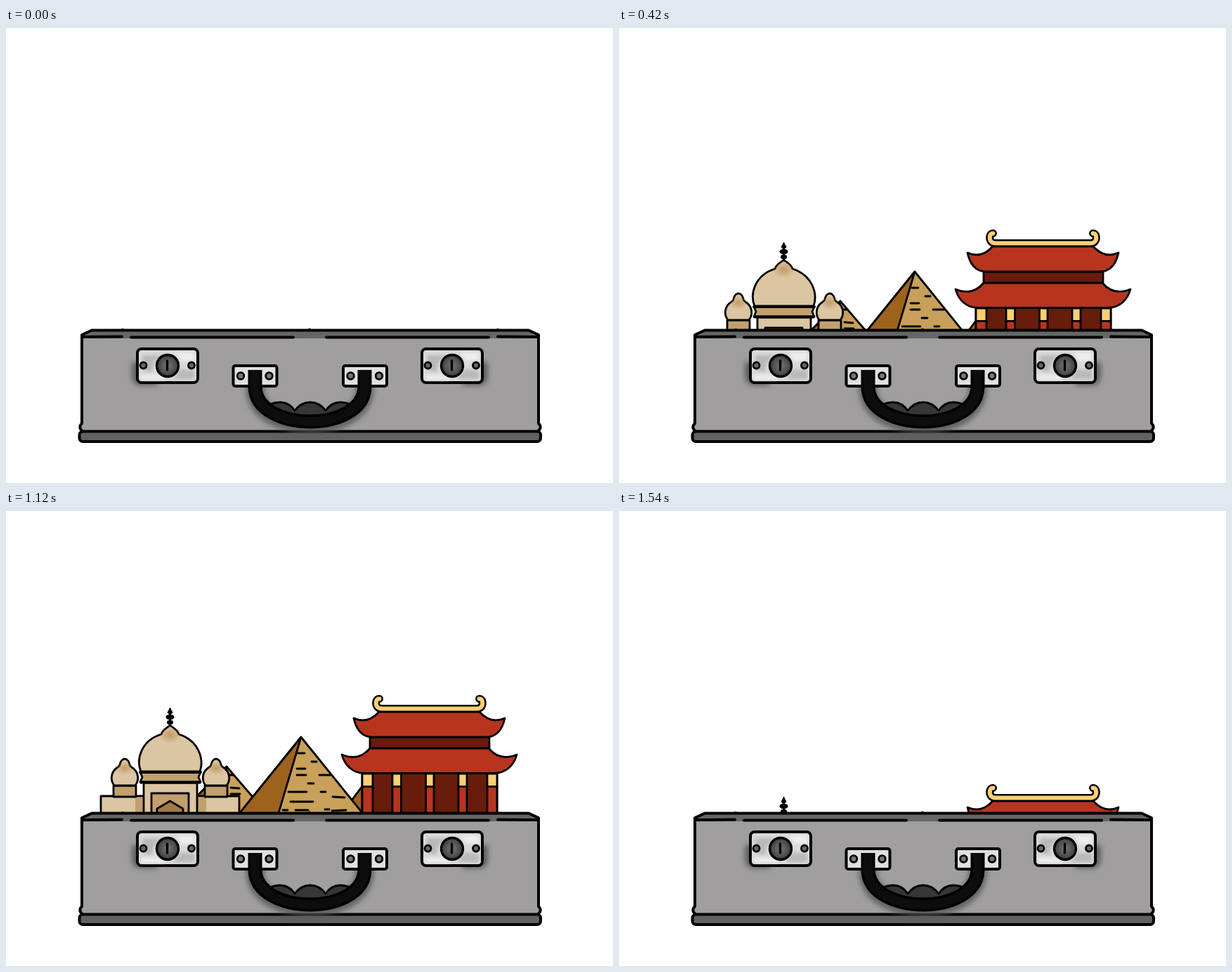
Write an HTML page that moves like this. It is 864 px wide and 648 px high and loops after 1.68 s.

```html
<!DOCTYPE html>
<html lang="en">
<head>
<meta charset="utf-8">
<title>Suitcase of landmarks</title>
<style>
  html, body { margin: 0; width: 100%; height: 100%; overflow: hidden; background: #fff; }
  svg { display: block; width: 100%; height: 100%; }
  .ink { stroke: #000; stroke-width: 2.8; stroke-linejoin: round; stroke-linecap: round; }
  .bold { stroke: #000; stroke-width: 4; stroke-linejoin: round; stroke-linecap: round; }
  .line { fill: none; }
  .cream { fill: #dbc5a2; }
  .tan { fill: #c2a06d; }
  .sand { fill: #c8a05a; }
  .umber { fill: #9d631c; }
  .red { fill: #b7351f; }
  .maroon { fill: #671c0c; }
  .gold { fill: #fbd071; }
</style>
</head>
<body>
<svg viewBox="0 0 864 648">
  <defs>
    <filter id="soft" x="-50%" y="-50%" width="200%" height="200%"><feGaussianBlur stdDeviation="3.5"/></filter>
    <filter id="faint" x="-50%" y="-50%" width="200%" height="200%"><feGaussianBlur stdDeviation="2"/></filter>
    <radialGradient id="knob"><stop offset=".2" stop-color="#6c6c6c"/><stop offset="1" stop-color="#3c3c3c"/></radialGradient>
    <radialGradient id="tipShade"><stop offset=".1" stop-color="#b98f50" stop-opacity=".7"/><stop offset="1" stop-color="#b98f50" stop-opacity="0"/></radialGradient>
    <clipPath id="aboveCase"><path d="M0 0H864V434H0Z"/></clipPath>

    <g id="turret">
      <path class="ink tan" d="M151 366H183V382H151Z"/>
      <path class="ink cream" d="M152 366C146 358 147 346 157 340Q160 338 160 336C161 331 164 328 167 328S173 331 174 336Q174 338 177 340C187 346 188 358 182 366Z"/>
      <ellipse cx="167" cy="341" rx="13" ry="10" fill="url(#tipShade)"/>
    </g>

    <g id="lock">
      <rect class="bold" x="187" y="457" width="86" height="48" rx="6" fill="#d8d9d8"/>
      <g filter="url(#faint)">
        <path d="M194 466H222Q208 474 208 490L196 488ZM248 486L268 488V500H238Z" fill="#b9b9b9"/>
        <path d="M242 462H268V474H250ZM192 494H226V501H192Z" fill="#ededec"/>
      </g>
      <g class="ink">
        <circle cx="230" cy="481" r="15.5" fill="url(#knob)" stroke-width="3.4"/>
        <path d="M229.5 474V487" stroke-width="3.4"/>
        <circle cx="195.5" cy="480.5" r="4.5" fill="#686868"/>
        <circle cx="264" cy="480.5" r="4.5" fill="#686868"/>
      </g>
    </g>

    <g id="bracket">
      <rect class="bold" x="323.5" y="481" width="62" height="29" rx="3" fill="#e0e0e0"/>
      <path d="M329 504H380" stroke="#bbb" stroke-width="5" filter="url(#faint)"/>
      <circle class="ink" cx="334" cy="495.5" r="4.8" fill="#777"/>
      <circle class="ink" cx="374.5" cy="495.5" r="4.8" fill="#777"/>
    </g>
    <path id="grip" d="M354.5 487V511C355 544 395 560.5 433 560.5S510 544 510.5 511V487"/>
    <path id="ridge" d="M529.5 242.5C525 242 523 249 526.5 254Q528.5 256.500 533 256.500H668Q672.500 256.500 674.500 254C678 249 676 242 671.500 242.500"/>
  </defs>

  <g clip-path="url(#aboveCase)">
    <g id="landmarks">
      <!-- pyramids -->
      <path class="ink sand" d="M312 339L392 432H219Z"/>
      <path class="ink umber" d="M312 339L292 432H219Z"/>
      <path class="ink umber" d="M530 334L570 432H456Z"/>
      <path class="ink sand" d="M418 297L527 432H309Z"/>
      <path class="ink umber" d="M418 297L378 432H309Z"/>
      <path class="ink line" d="M414 320h9M433 332h7M412 342h12M412 351h13M444 351h16M428 363h8M400 375h26M446 375h7M463 382l17 1M403 389h32M392 401h7M410 401h18M452 400h6M462 402l20-1M388 412h49M463 413l32-1
        M316 351h6M318 369l12 1M318 378h13"/>

      <!-- domed palace -->
      <path class="ink cream" d="M133 381H194V432H133ZM270 381H330V432H270Z"/>
      <path class="tan" d="M182 382.5H193V432H182ZM271 382.5H283V432H271Z"/>
      <use href="#turret"/>
      <use href="#turret" x="130"/>
      <path class="ink cream" d="M194 362H270V432H194Z"/>
      <path class="ink tan" d="M205 377H258V432H205Z"/>
      <path class="ink" fill="#a17b42" d="M213 432V399L231.5 388L250 399V432Z"/>
      <path class="ink tan" d="M189 347H275L272 354L275 361H189L192 354Z"/>
      <path class="bold line" d="M189 347H275M190 361.5H274"/>
      <path class="ink cream" d="M190 346C183 329 190 302 219 293C221 286 226 285 231.5 280C237 285 242 286 244 293C273 302 280 329 274 346Z"/>
      <ellipse cx="231.5" cy="294" rx="16" ry="12" fill="url(#tipShade)"/>
      <path class="ink" d="M231.5 257V281" stroke-width="2"/>
      <path d="M231.5 255L235.5 262L231.5 266L227.5 262Z"/>
      <ellipse cx="231.5" cy="268.5" rx="6" ry="3.8"/>
      <ellipse cx="231.5" cy="276" rx="4.5" ry="3.2"/>

      <!-- red temple -->
      <path class="ink gold" d="M494 421.5H709L715 432H487Z"/>
      <path class="ink maroon" d="M505 348H697V421.5H505Z"/>
      <g id="columns" class="ink"></g>
      <path class="ink maroon" d="M516 297H686V314H516Z"/>
      <path class="ink red" d="M516 313H685Q701 332 725 322C721 337 710 348 693 348.5H508C491 348 480 337 476 322Q500 332 516 313Z"/>
      <path class="ink red" d="M529 261H672Q688 279 708 270C705 284 698 297 681 297H520C503 297 496 284 493 270Q513 279 529 261Z"/>
      <g fill="none" stroke-linecap="round">
        <use href="#ridge" stroke="#000" stroke-width="11"/>
        <use href="#ridge" stroke="#fbd071" stroke-width="6"/>
      </g>
    </g>
  </g>

  <!-- case -->
  <path class="bold" fill="#a09e9f" d="M108 438V563Q104 567 106 571L110 576H756L760 571Q762 567 758 563V438Z"/>
  <path class="bold" fill="#656666" d="M108 439V437L122 430.5H744L758 437V439"/>
  <path d="M110 440H756" stroke="#656666" stroke-width="4"/>
  <path d="M411 440H454" stroke="#7b7b7b" stroke-width="5" filter="url(#faint)"/>
  <path class="bold line" d="M109 440L165 439.5M178 440.5H409M456 440.5H687M700 439.5L757 440"/>
  <path class="bold line" d="M432 430V429.5M166 430V429.7M700 430V429.7"/>
  <rect class="bold" x="104.5" y="574.5" width="656.5" height="14.5" rx="5" fill="#616162"/>

  <path d="M179 476H215V509H190Q179 507 179 495ZM686 476H650V509H675Q686 507 686 495Z" fill="#555" opacity=".85" filter="url(#soft)"/>
  <use href="#lock"/>
  <use href="#lock" x="405"/>

  <use href="#grip" y="4" fill="none" stroke="#555" stroke-width="26" opacity=".8" filter="url(#soft)"/>
  <use href="#bracket"/>
  <use href="#bracket" x="156.5"/>
  <path class="ink" fill="#363636" d="M376 536Q399 527 411 545Q420 533 433 533Q446 533 455 545Q467 527 490 536L482 556H384Z"/>
  <use href="#grip" fill="none" stroke="#000" stroke-width="20"/>
  <use href="#grip" fill="none" stroke="#0d0d0d" stroke-width="13"/>
</svg>
<script>
  const STEP = 140;
  const REST = [0, 0];
  // Offsets from the fully raised pose; the first is completely inside the case.
  const RISE = [[3, 220], [3, 152], [3, 88], [3, 50], [2, 25]];
  const POSES = [...RISE, REST, REST, REST, ...RISE.slice(1).reverse()];

  const columns = [[505, 15], [548, 12.5], [595.5, 11.5], [642, 12], [683, 14]];
  document.getElementById("columns").innerHTML = columns.map(([x, w]) =>
    `<path class="red" d="M${x} 367.5h${w}V421.5h${-w}Z"/><path class="gold" d="M${x} 349h${w}v18.5h${-w}Z"/>`
  ).join("");

  const landmarks = document.getElementById("landmarks");
  const start = performance.now();
  function draw() {
    const step = Math.floor((performance.now() - start) / STEP) % POSES.length;
    landmarks.setAttribute("transform", `translate(${POSES[step]})`);
    requestAnimationFrame(draw);
  }
  draw();
</script>
</body>
</html>
```
